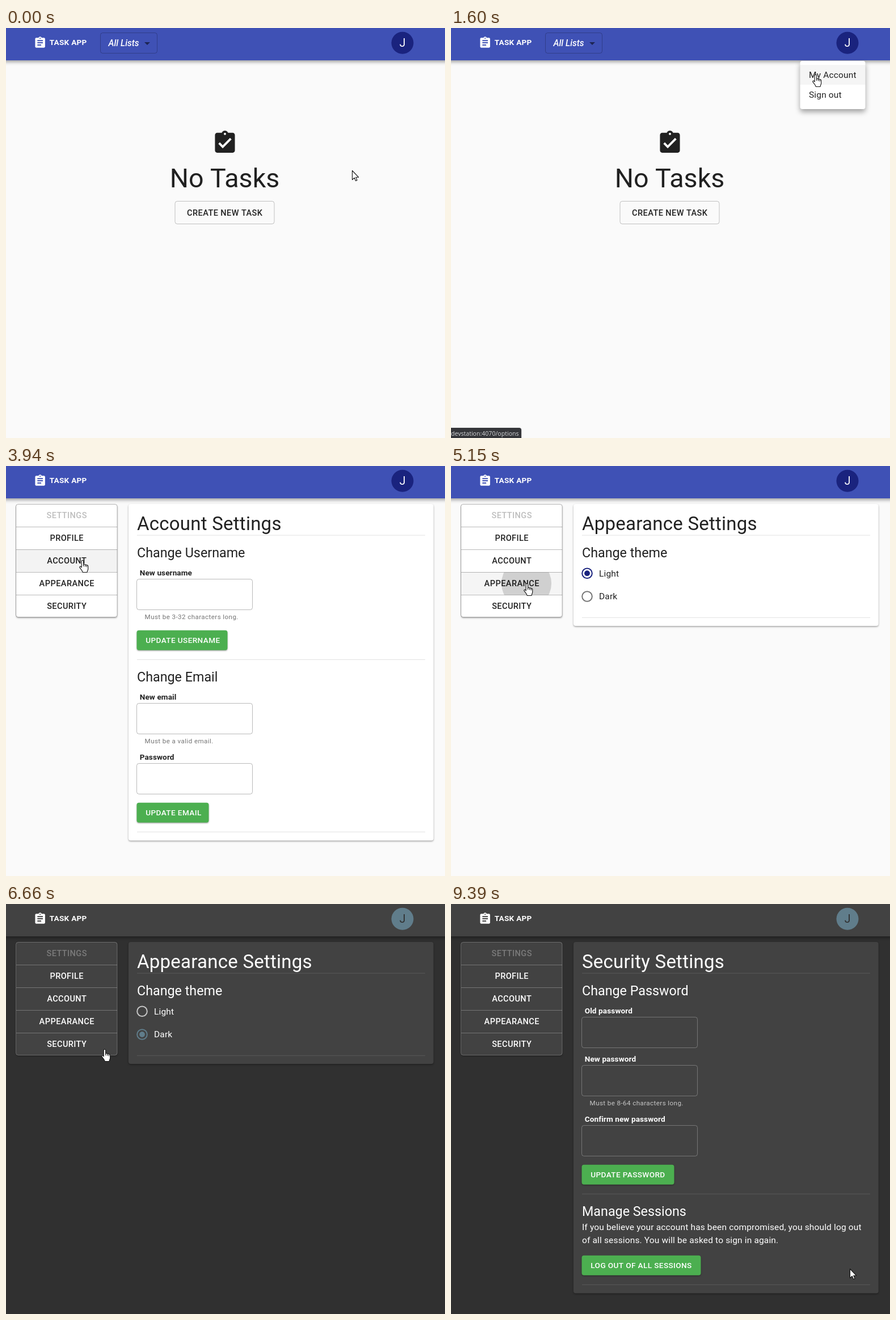
An HTML page with a canvas for the animation above (9460 ms loop, 774x723 px).

```html
<!DOCTYPE html>
<html lang="en">
<head>
<meta charset="utf-8">
<title>Task app settings</title>
<style>
  html, body { margin: 0; width: 100%; height: 100%; overflow: hidden; background: #fafafa; }
  canvas { display: block; }
</style>
</head>
<body>
<canvas id="stage" width="774" height="723"></canvas>
<script>
const ctx = document.getElementById('stage').getContext('2d');
const LOOP = 9460;
const ZOOM = .971; // the interface is shown slightly reduced
const SETTINGS_AT = 1780, ACCOUNT_AT = 3480, APPEARANCE_AT = 5110, DARK_AT = 6150, SECURITY_AT = 7180;
const GREEN = '#4caf50';

const light = {
  page: '#fafafa', paper: '#fff', bar: '#3f51b5', accent: '#1a237e', initial: '#fff',
  text: 'rgba(0,0,0,.87)', soft: 'rgba(0,0,0,.54)', off: 'rgba(0,0,0,.26)',
  line: 'rgba(0,0,0,.12)', border: 'rgba(0,0,0,.27)', ink: '0,0,0', hover: .04
};
const dark = {
  page: '#303030', paper: '#424242', bar: '#424242', accent: '#607d8b', initial: '#303030',
  text: '#fff', soft: 'rgba(255,255,255,.7)', off: 'rgba(255,255,255,.3)',
  line: 'rgba(255,255,255,.12)', border: 'rgba(255,255,255,.27)', ink: '255,255,255', hover: .08
};

const pages = {
  Profile: [{ head: 'Public profile', fields: [['Full Name', '', 'Jory Feldwick']], button: ['UPDATE PROFILE', 143.5] }],
  Account: [
    { head: 'Change Username', fields: [['New username', 'Must be 3-32 characters long.']], button: ['UPDATE USERNAME', 160] },
    { head: 'Change Email', fields: [['New email', 'Must be a valid email.'], ['Password']], button: ['UPDATE EMAIL', 127] }
  ],
  Appearance: [{ head: 'Change theme', radios: ['Light', 'Dark'] }],
  Security: [
    { head: 'Change Password', fields: [['Old password'], ['New password', 'Must be 8-64 characters long.'], ['Confirm new password']],
      button: ['UPDATE PASSWORD', 163] },
    { head: 'Manage Sessions',
      lines: ['If you believe your account has been compromised, you should log out',
              'of all sessions. You will be asked to sign in again.'],
      button: ['LOG OUT OF ALL SESSIONS', 210] }
  ]
};
const rows = ['SETTINGS', 'PROFILE', 'ACCOUNT', 'APPEARANCE', 'SECURITY'];

// [row, start, end]
const hovers = [[1, 2400, 3060], [2, 3060, 4330], [3, 4330, 5980], [4, 6640, 7890]];
// [row, x, y, press time]
const ripples = [[2, 135, 166, 3370], [3, 133, 207, 4985], [4, 170, 253, 7060]];
// [time, x, y] of the pointer's hot spot
const route = [
  [340, 610, 251], [760, 696, 32], [910, 696, 32], [1270, 651, 72], [1560, 643, 82], [1820, 643, 82],
  [2230, 256, 128], [2500, 152, 133], [2900, 133, 139], [3030, 133, 143], [3180, 135, 166], [4170, 135, 166],
  [4510, 133, 205], [4760, 133, 205], [4830, 134, 207], [5940, 134, 207], [6090, 238, 229], [6260, 238, 229],
  [6640, 174, 256], [6870, 169, 253], [7840, 169, 253], [8760, 576, 589], [9100, 703, 641], [9360, 703, 641],
  [9390, 703, 643]
];
const handTimes = [[690, 960], [1130, 1860], [2400, 6010], [6070, 6290], [6480, 7900]];

const boardShape = 'M19 3h-4.18C14.4 1.84 13.3 1 12 1c-1.3 0-2.4.84-2.82 2H5c-1.1 0-2 .9-2 2v14c0 1.1.9 2 2 2h14c1.1 0 2-.9 2-2V5c0-1.1-.9-2-2-2zm-7 0c.55 0 1 .45 1 1s-.45 1-1 1-1-.45-1-1 .45-1 1-1z';
const listIcon = new Path2D(boardShape + 'm2 14H7v-2h7v2zm3-4H7v-2h10v2zm0-4H7V7h10v2z');
const doneIcon = new Path2D(boardShape + 'M10 17l-4-4 1.41-1.41L10 14.17l6.59-6.59L18 9l-8 8z');
const arrowShape = new Path2D('M.5.5V16.6L4.2 13.1 6.6 18.6 9 17.6 6.7 12.2H11.6Z');
const handShape = new Path2D('M-1.8 2a1.7 1.7 0 0 1 3.4 0V8c.4-1.1 2.8-.9 3 .5 .5-.9 2.5-.7 2.7.7 .6-.8 2.4-.4 2.4 1.3v5c0 2-1.4 3-1.7 6H.2c-.3-2.5-2.6-4.8-5.2-8.3-.9-1.6.9-2.8 2.2-1.5l1 1.2z');

const clamp = v => Math.max(0, Math.min(1, v));
const progress = (t, start, length) => clamp((t - start) / length);
const within = (t, spans) => spans.some(([a, b]) => t >= a && t < b);

// cubic-bezier(.4, 0, .2, 1)
function ease(p) {
  let low = 0, high = 1, s = 0;
  for (let i = 0; i < 18; i++) {
    s = (low + high) / 2;
    const u = 1 - s;
    if (1.2 * u * u * s + .6 * u * s * s + s ** 3 < p) low = s; else high = s;
  }
  return s * s * (3 - 2 * s);
}

function text(str, x, y, size, color, { weight = 400, spacing = 0, align = 'left', style = '', family = 'Roboto' } = {}) {
  ctx.font = `${style} ${weight} ${size * ZOOM}px ${family}, sans-serif`;
  ctx.letterSpacing = `${spacing * size * ZOOM}px`;
  ctx.textAlign = align;
  ctx.fillStyle = color;
  ctx.fillText(str, x, y);
}
const caps = { weight: 500, spacing: .02857 };
const body = { spacing: .00938 };

function box(x, y, w, h, { radius = 4, fill, stroke, lift = 0 }) {
  ctx.beginPath();
  ctx.roundRect(x, y, w, h, radius);
  if (fill) {
    ctx.save();
    if (lift) {
      ctx.shadowColor = 'rgba(0,0,0,.36)';
      ctx.shadowBlur = lift * 2;
      ctx.shadowOffsetY = lift;
    }
    ctx.fillStyle = fill;
    ctx.fill();
    ctx.restore();
  }
  if (stroke) {
    ctx.lineWidth = 1;
    ctx.strokeStyle = stroke;
    ctx.stroke();
  }
}

function rect(x, y, w, h, color) {
  ctx.fillStyle = color;
  ctx.fillRect(x, y, w, h);
}

function disc(x, y, r, color) {
  ctx.beginPath();
  ctx.arc(x, y, r, 0, Math.PI * 2);
  ctx.fillStyle = color;
  ctx.fill();
}

function icon(path, x, y, scale, color) {
  ctx.save();
  ctx.translate(x, y);
  ctx.scale(scale, scale);
  ctx.fillStyle = color;
  ctx.fill(path);
  ctx.restore();
}

function drawBar(t, theme) {
  box(-20, -20, 814, 77, { radius: 0, fill: theme.bar, lift: 3 });
  icon(listIcon, 48.5, 14.4, ZOOM, '#fff');
  text('TASK APP', 76.7, 30.3, 14, '#fff', { weight: 700, spacing: .02 });
  if (t < SETTINGS_AT) {
    box(166.5, 8.5, 100, 36, { stroke: 'rgba(0,0,0,.23)' });
    text('All Lists', 180.5, 32, 16, '#fff', { weight: 500, style: 'italic' });
    ctx.beginPath();
    ctx.moveTo(244, 25);
    ctx.lineTo(254, 25);
    ctx.lineTo(249, 30);
    ctx.fillStyle = 'rgba(0,0,0,.54)';
    ctx.fill();
  }
  disc(699, 26.3, 19.5, theme.accent);
  const spread = ease(progress(t, 780, 400));
  const glow = .2 * (1 - ease(progress(t, 880, 400)));
  if (spread && glow) disc(699, 26.3, 19.5 * spread, `rgba(255,255,255,${glow})`);
  text('J', 699, 33.3, 20, theme.initial, { align: 'center' });
}

function drawHome(theme) {
  icon(doneIcon, 362.6, 179, 1.95, '#212121');
  text('No Tasks', 385.5, 280.5, 48, theme.text, { align: 'center' });
  box(298, 305.5, 175, 40, { stroke: 'rgba(0,0,0,.23)' });
  text('CREATE NEW TASK', 385.7, 330.5, 15, theme.text, { ...caps, align: 'center' });
}

function drawMenu(t) {
  const open = ease(progress(t, 880, 260));
  const shown = open * (1 - ease(progress(t, SETTINGS_AT, 220)));
  if (!shown) return;
  ctx.save();
  ctx.globalAlpha = shown;
  ctx.translate(699, 58);
  ctx.scale(.75 + .25 * open, .56 + .44 * open);
  ctx.translate(-699, -58);
  box(615.5, 58, 115, 85, { fill: '#fff', lift: 5 });
  rect(615.5, 65, 115, 35, `rgba(0,0,0,${.04 * progress(t, 1150, 150)})`);
  text('My Account', 631, 87.5, 16, light.text, body);
  text('Sign out', 631, 122.5, 16, light.text, body);
  ctx.restore();
}

function drawRipple(t, theme, [row, x, y, press]) {
  const grow = ease(progress(t, press, 550));
  const fade = 1 - ease(progress(t, press + 150, 550));
  if (!grow || !fade) return;
  ctx.save();
  ctx.beginPath();
  ctx.rect(18, 67.5 + row * 40, 178, 40);
  ctx.clip();
  disc(x, y, (x - 17) * 1.02 * grow, `rgba(${theme.ink},${(.1 + .2 * grow) * .87 * fade})`);
  ctx.restore();
}

function drawSidebar(t, theme) {
  box(18, 67.5, 178, 199, { fill: theme.paper, lift: 1.5 });
  for (const [row, start, end] of hovers) {
    const level = progress(t, start, 200) - progress(t, end, 200);
    if (level > 0) rect(18, 67.5 + row * 39.8, 178, 39.8, `rgba(${theme.ink},${theme.hover * level})`);
  }
  for (const ripple of ripples) drawRipple(t, theme, ripple);
  box(17.5, 67.5, 178.5, 199, { stroke: theme.border });
  rows.forEach((name, i) => {
    if (i) rect(18, Math.round(67.2 + i * 39.85), 178, 1, theme.border);
    text(name, 107.2, 92.3 + i * 39.85, 15, i ? theme.text : theme.off, { ...caps, align: 'center' });
  });
}

function drawRadio(t, theme, label, y, checked) {
  const halo = label === 'Dark' ? ease(progress(t, 6100, 200)) * (1 - ease(progress(t, 6200, 300))) : 0;
  if (halo) disc(240, y, 20, `rgba(${theme.ink},${.12 * halo})`);
  ctx.beginPath();
  ctx.arc(240, y, 8.8, 0, Math.PI * 2);
  ctx.lineWidth = 2;
  ctx.strokeStyle = checked ? theme.accent : theme.soft;
  ctx.stroke();
  const size = label === 'Dark' ? ease(progress(t, DARK_AT, 150)) : 1;
  if (checked) disc(240, y, 4.9 * size, theme.accent);
  text(label, 261, y + 5.3, 16, theme.text, body);
}

// Draws one section below the rule at y, or only measures it, and returns the y of its closing rule.
function layoutSection(section, y, t, theme, paint) {
  let buttonTop = y;
  if (paint) text(section.head, 231, y + 39.3, 24, theme.text);
  if (section.fields) {
    let top = y + 77.5;
    for (const [label, help, value] of section.fields) {
      if (paint) {
        text(label, 235.7, top - 7, 14, theme.text, { weight: 700, spacing: .00714 });
        box(230.5, Math.round(top) - .5, 204, 54, { stroke: theme.border });
        if (value) text(value, 244.6, top + 32.7, 16, theme.text);
        if (help) text(help, 244.6, top + 70, 12, theme.soft, { spacing: .03333 });
      }
      buttonTop = top + (help ? 91 : 70);
      top += help ? 106 : 85;
    }
  }
  (section.lines || []).forEach((line, i) => {
    const base = y + 63.5 + i * 23.4;
    if (paint) text(line, 231, base, 16, theme.text, body);
    buttonTop = base + 22.6;
  });
  if (section.radios) {
    if (paint) section.radios.forEach((label, i) =>
      drawRadio(t, theme, label, y + 67.2 + i * 40.8, (label === 'Dark') === (theme === dark)));
    return y + 144.5;
  }
  if (paint) {
    const [label, width] = section.button;
    box(230.5, Math.floor(buttonTop) - .3, width, 35, { fill: GREEN, lift: 1.2 });
    text(label, 246.3, buttonTop + 21.6, 14, '#fff', caps);
  }
  return buttonTop + 50.5;
}

function drawCard(name, t, theme) {
  const sections = pages[name];
  const bottom = sections.reduce((y, s) => layoutSection(s, y, t, theme, false), 122) + 15.5;
  box(216, 67, 537.7, bottom - 67, { fill: theme.paper, lift: 1.5 });
  text(`${name} Settings`, 231, 113, 34, theme.text, { spacing: .00735 });
  let y = 122;
  rect(231, y - .4, 508, 1, theme.line);
  for (const section of sections) {
    y = layoutSection(section, y, t, theme, true);
    rect(231, Math.round(y) - .2, 508, 1, theme.line);
  }
}

function drawStatus(t) {
  const shown = progress(t, 1210, 150) * (1 - progress(t, 2130, 200));
  if (!shown) return;
  ctx.save();
  ctx.globalAlpha = shown;
  box(-5, 705, 129, 24, { fill: '#35363a', lift: 1 });
  text('devstation:4070/options', 0, 718.8, 10.9, '#d4d6d9', { family: '"Open Sans"' });
  ctx.restore();
}

function pointerAt(t) {
  const next = route.findIndex(([time]) => time > t);
  if (next === 0) return route[0].slice(1);
  if (next < 0) return route[route.length - 1].slice(1);
  const [t0, x0, y0] = route[next - 1], [t1, x1, y1] = route[next];
  const p = (t - t0) / (t1 - t0), k = p * p * (3 - 2 * p);
  return [x0 + (x1 - x0) * k, y0 + (y1 - y0) * k];
}

function drawPointer(t) {
  const [x, y] = pointerAt(t);
  const shape = within(t, handTimes) ? handShape : arrowShape;
  ctx.save();
  ctx.translate(Math.round(x), Math.round(y));
  ctx.lineJoin = 'round';
  ctx.lineWidth = 1.1;
  ctx.fillStyle = '#fff';
  ctx.strokeStyle = '#111';
  ctx.fill(shape);
  ctx.stroke(shape);
  if (shape === handShape) {
    ctx.beginPath();
    for (const [lineX, top] of [[1.6, 8], [4.6, 8.5], [7.3, 9.2]]) {
      ctx.moveTo(lineX, top);
      ctx.lineTo(lineX, top + 3);
    }
    ctx.stroke();
  }
  ctx.restore();
}

function draw(t) {
  const theme = t < DARK_AT ? light : dark;
  rect(0, 0, 774, 723, theme.page);
  if (t < SETTINGS_AT) {
    drawHome(theme);
  } else {
    const name = t < ACCOUNT_AT ? 'Profile' : t < APPEARANCE_AT ? 'Account' : t < SECURITY_AT ? 'Appearance' : 'Security';
    drawSidebar(t, theme);
    drawCard(name, t, theme);
  }
  drawBar(t, theme);
  drawMenu(t);
  drawStatus(t);
  drawPointer(t);
}

const begin = performance.now();
function tick() {
  draw((performance.now() - begin) % LOOP);
  requestAnimationFrame(tick);
}
tick();
</script>
</body>
</html>
```
